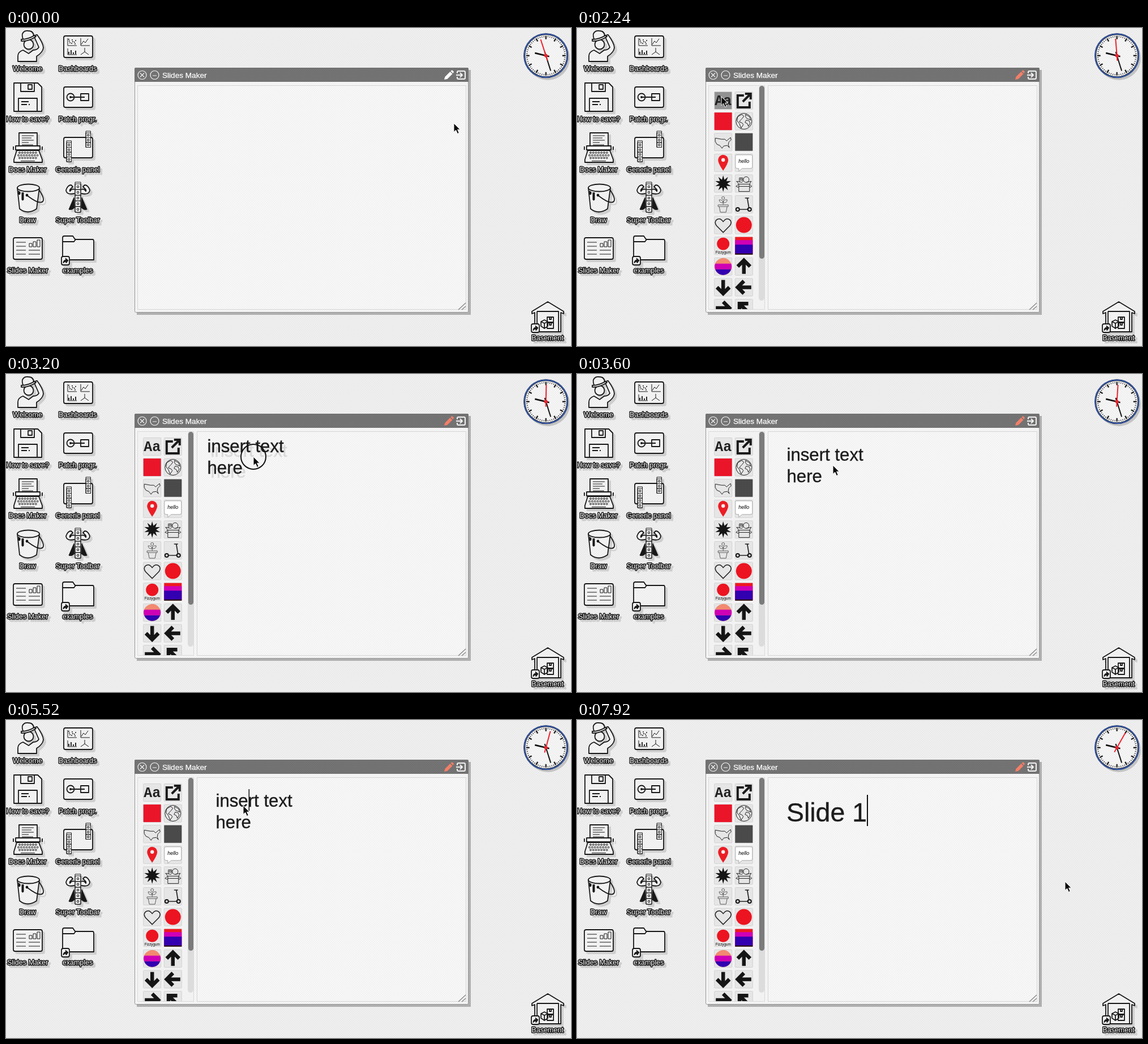
Write an HTML page that moves like this. It is 998x561 px and loops after 8 s.

```html
<!DOCTYPE html>
<html lang="en">
<head>
<meta charset="utf-8">
<title>Slides Maker</title>
<style>
html, body { margin: 0; width: 100%; height: 100%; overflow: hidden; background: #ededed; }
svg { display: block; }
text { font-family: "Liberation Sans", Arial, sans-serif; white-space: pre; }
.icons { filter: drop-shadow(4px 4px 0 #cfcfcf); }
.icons path, .icons circle, .icons ellipse { fill: none; stroke: #181818; stroke-width: 1.8; stroke-linejoin: round; }
.icons .f { fill: #f2f2f2; }
.icons .k { fill: #181818; }
.icons .t { stroke-width: 1; }
.label { font-size: 12.5px; text-anchor: middle; fill: #fff; stroke: #111; stroke-width: 2.8; paint-order: stroke; stroke-linejoin: round; }
.cell { fill: #e6e6e6; stroke: #d2d2d2; }
.item { fill: none; stroke: #222; stroke-width: 1; stroke-linejoin: round; }
</style>
</head>
<body>
<svg id="stage" width="998" height="561" viewBox="0 0 998 561"></svg>
<script>
const stage = document.getElementById('stage');
const path = (d, c = '') => `<path class="${c}" d="${d}"/>`;
const circle = (x, y, r, c = '') => `<circle class="${c}" cx="${x}" cy="${y}" r="${r}"/>`;
const box = (x, y, w, h) => `M${x} ${y}h${w}v${h}h${-w}z`;
const card = (x, y, w, h) => path(`M${x + 3} ${y}h${w - 6}q3 0 3 3v${h - 6}q0 3 -3 3h${6 - w}q-3 0 -3 -3v${6 - h}q0 -3 3 -3z`, 'f');
const label = (x, y, s) => `<text class="label" x="${x}" y="${y}">${s}</text>`;
const range = (n, f) => Array.from({length: n}, (_, i) => f(i)).join('');
const strip = (x, y, w, n) => path(box(x, y, w, 3 + n * w), 'f t') +
  range(n, i => path(box(x, y + 3 + i * w, w, w) + box(x + w / 2 - 1.5, y + 1.5 + (i + .5) * w, 3, 3), 't'));
const shortcut = (x, y) => card(x, y, 14, 15) +
  path(`M${x + 3} ${y + 12}q0 -6 5 -6l-1 -3 5 4 -4 5 0 -3q-3 0 -5 3z`, 'k t');

const welcome = path('M21 59V50Q21 42 30 39L40 45L48 39Q55 39 58 34L51 18Q50 12 55 12Q66 27 66 35Q65 43 54 50V59Z', 'f') +
  circle(40, 29, 8.5, 'f') + path('M30 19C26 9 32 4 39 5C47 5 49 10 49 15M27 23Q40 24 53 15L50 13Q40 20 27 20Z', 'f');

const floppy = path('M14 97H56L63 104V147H14Z', 'f') +
  path('M26 97V112H50V97M39 100h7v8h-7zM22 147V124H55V147') + path('M27 130h13M27 135h10M40 135h2');

const typewriter = path('M23 211V185H55V211', 'f') +
  path('M28 190h21M28 194h17M28 198h21M28 202h12M28 206h20', 't') +
  path('M17 208H60V215H17ZM13 209v6M64 209v6M19 216H58L64 232V237H14V232Z', 'f') +
  range(3, r => range(7 + r % 2, i => circle(24 + i * 4.8 - (r % 2) * 2, 220 + r * 4.6, 1.4, 't'))) +
  path('M26 234.5H51', 't');

const bucket = path('M20 282L24 319Q38 330 54 319L59 282', 'f') +
  '<ellipse class="f" cx="39.5" cy="282" rx="19.5" ry="6.5"/>' +
  path('M58 285Q69 301 65 306Q59 312 38 296') + circle(37, 295, 1.5, 'k') +
  path('M22 287V293q1.5 2 3 0V289M28 290V303q1.5 2 3 0V290', 'k t');

const slides = card(13, 370, 51, 38) +
  path('M18 378h17M18 385h17M18 392h17M18 399h17M40 392h20M40 399h20', 't') +
  path('M41 380h5v6h-5zM48 377h5v9h-5zM55 374h5v12h-5z', 't');

const dashboards = card(102, 14, 51, 38) +
  range(9, i => circle(111 + i * 5 % 14, 20 + i * 7 % 9, .6, 'k t')) +
  path('M109 18v13h16M132 18v13h16M133 29l4 -6 3 3 5 -7M109 36v11h16M139 35v7l-7 5M139 42l7 5', 't') +
  path('M111 46v-4M115 46v-7M119 46v-3M123 46v-6');

const patch = card(102, 104, 51, 36) + circle(114, 122, 6.5) + path('M114 122H139M132 116h14v12h-14z') + circle(114, 122, 1, 'k');
const panel = card(102, 193, 51, 36) + strip(107, 199, 8.5, 4) + strip(141, 182, 8.5, 3);
const hero = path('M120 299L111 320Q116 322 121 317ZM134 299L143 320Q138 322 133 317Z', 'k t') +
  path('M121 292Q107 295 106 286Q109 277 115 277L118 280L114 284Q112 286 113 288Q116 283 121 285M133 292Q147 295 148 286Q145 277 139 277L136 280L140 284Q142 286 141 288Q138 283 133 285', 'f') +
  strip(122, 272, 10, 5);
const folder = path('M100 409V370Q100 367 103 367H118L122 373H153Q155 373 155 376V409Z', 'f') + path('M100 377H120L123 373') + shortcut(98, 403);
const basement = path('M929 504V500L957 483L985 500V504L980 502V536H934V502Z', 'f') + path('M938 500H976V536M938 500V530') +
  path('M956 510h11v9h-11zM956 520h11v10h-11zM945 518l6 -3 6 3v8l-6 4 -6 -4zM945 518l6 3 6 -3M951 521v9M960 510v4h3v-4M960 520v4h3v-4') + shortcut(928, 522);

const names = ['Welcome', 'How to save?', 'Docs Maker', 'Draw', 'Slides Maker', 'Dashboards', 'Patch progr.', 'Generic panel', 'Super Toolbar', 'examples'];
const desktop = `<g class="icons">${welcome + floppy + typewriter + bucket + slides + dashboards + patch + panel + hero + folder + basement}
  ${names.map((s, i) => label(i < 5 ? 38 : 126.5, 76 + i % 5 * 89, s)).join('')}${label(956.5, 551, 'Basement')}</g>`;

const tick = i => `<path d="M0 -35V${i % 5 ? -32.5 : -29}" transform="rotate(${i * 6})" stroke="#222" stroke-width="${i % 5 ? 1 : 2.4}"/>`;
const clock = `<circle cx="957" cy="53" r="39" fill="#c4c4c4"/><g transform="translate(953.7 48.8)">
  <circle r="38" fill="#f4f4f4" stroke="#222" stroke-width="3"/><circle r="38.3" fill="none" stroke="#3459b0" stroke-width="2"/>
  ${range(60, tick)}
  <path d="M0 6V-20" transform="rotate(283.5)" stroke="#111" stroke-width="2.6"/>
  <path d="M0 7V-28" transform="rotate(162.5)" stroke="#111" stroke-width="2"/>
  <g id="second"><path d="M0 9V-30" stroke="#f0202c" stroke-width="2"/><circle r="3" fill="#f0202c"/></g></g>`;

// Palette items are drawn around the middle of their cell.
const bigArrow = a => `<path d="M0 13V-10M-11 0L0 -11L11 0" fill="none" stroke="#151515" stroke-width="6.5" transform="rotate(${a})"/>`;
const burst = range(20, i => {
  const r = i % 2 ? 7 : 14.5, a = i * Math.PI / 10;
  return `${i ? 'L' : 'M'}${(r * Math.sin(a)).toFixed(1)} ${(-r * Math.cos(a)).toFixed(1)}`;
});
const wheel = x => `<circle cx="${x}" cy="9" r="3" fill="#ddd" stroke="#151515" stroke-width="2"/>`;
const items = [
  '<text x="0" y="8" text-anchor="middle" style="font:bold 25px \'Liberation Mono\',monospace" fill="#222">Aa</text>',
  '<path d="M0 -9H-11V12H10V2M2 -12H12V-2M11 -11L-2 2" fill="none" stroke="#1a1a1a" stroke-width="4"/>',
  '<rect x="-15.5" y="-15.5" width="31" height="31" fill="#ea1529"/>',
  circle(0, 0, 14, 'item') + path('M-11 -8L-4 -12L0 -9L-3 -5L-6 -2L-8 1L-3 3L-1 6L-5 12L-8 4L-12 -1ZM3 -12L10 -8L12 -2L8 -4L5 -5L3 -8ZM4 -2L9 -1L11 3L8 9L6 4L2 2Z', 'item'),
  path('M-14 -7L-3 -5L3 -5L6 -2L13 -8L14 -4L10 0L9 5L11 10L7 6L1 7L-2 11L-6 6L-11 4L-14 -1Z', 'item'),
  '<rect x="-15.5" y="-15.5" width="31" height="31" fill="#4a4a4a"/>',
  '<path d="M0 14Q-9 1 -9 -5A9 9 0 0 1 9 -5Q9 1 0 14Z" fill="#ec1c24"/><circle cy="-5" r="3.2" fill="#eee"/>',
  '<path d="M-13 -14H13Q15 -14 15 -11V7Q15 10 12 10H-3L-9 15V10H-12Q-15 10 -15 7V-11Q-15 -14 -13 -14Z" fill="#fff" stroke="#aaa"/><text y="0" text-anchor="middle" font-size="9" font-style="italic">hello</text>',
  `<path d="${burst}Z" fill="#151515"/>`,
  path('M-9 1H10V14H-9ZM-9 1L-14 5L-9 7M10 1L14 5L10 7M-9 1L-13 -4L-3 -2M10 1L13 -4L4 -2M-8 -3V-10H-2V-3M-9 5H10', 'item') + circle(4, -7, 5, 'item') + circle(-5, -7, 1.5, 'item'),
  '<g opacity=".7">' + path('M-9 1H9V4H-9ZM-7 4L-5 14H5L7 4M0 1V-7M0 -3Q-7 -2 -7 -8Q-1 -8 0 -3Q1 -9 7 -8Q7 -2 0 -3', 'item') + circle(0, -11, 2.5, 'item') + '</g>',
  '<path d="M-10 9H5L9 7L6 -11M2 -11H9" fill="none" stroke="#222" stroke-width="1.7"/>' + wheel(-11) + wheel(10),
  '<path d="M0 13L-12 1Q-16 -5 -12 -9Q-6 -14 0 -6Q6 -14 12 -9Q16 -5 12 1Z" fill="none" stroke="#222" stroke-width="1.5"/>',
  '<circle r="14" fill="#ec1420"/>',
  '<circle cy="-3.5" r="11" fill="#ec1420"/><text y="13.5" text-anchor="middle" font-size="6.3">Fizzygum</text>',
  '<path d="M-15.5 -15.5H15.5V15.5H-15.5Z" fill="#ef1a20"/><path d="M-15.5 -10H15.5V15H-15.5Z" fill="#cf00b5"/><path d="M-15.5 -2H15.5V13.5H-15.5Z" fill="#3200b0"/><path d="M-15.5 13.5H15.5V15.5H-15.5Z" fill="#111"/>',
  '<circle r="15" fill="#f28a70"/><path d="M-14.1 -5H14.1A15 15 0 0 1 14.1 5H-14.1A15 15 0 0 1 -14.1 -5Z" fill="#cf00b5"/><path d="M-14.1 5H14.1A15 15 0 0 1 -14.1 5Z" fill="#3200b0"/>',
  bigArrow(0), bigArrow(180), bigArrow(-90), bigArrow(90), bigArrow(-45)
];
const palette = `<g id="palette"><rect x="232.5" y="101.5" width="99" height="395" fill="#f2f2f2" stroke="#dadada"/>
  <g clip-path="url(#clip)">${items.map((s, i) => `<g transform="translate(${258.2 + i % 2 * 36.6} ${128 + (i >> 1) * 36.6})"><rect class="cell"${i ? '' : ' id="hot"'} x="-15.5" y="-15.5" width="31" height="31" rx="1"/>${s}</g>`).join('')}</g>
  <rect x="321" y="102" width="10" height="379" rx="5" fill="#dcdcdc"/><rect x="322" y="102" width="9" height="305" rx="4.5" fill="#7b7b7b"/></g>`;

const frame = `<path d="M231 74H821V506H231Z" fill="#b0b0b0"/><rect x="227.5" y="70.5" width="589" height="431" rx="2" fill="#f5f5f5" stroke="#999"/>
  <path d="M227 72q0 -2 2 -2H815q2 0 2 2V95H227Z" fill="#737373"/>
  <g fill="none" stroke="#f4f4f4" stroke-width="1.2"><circle cx="240.5" cy="83" r="7.5"/><circle cx="262.5" cy="83" r="7.5"/>
  <path d="M237 79.5l7 7M244 79.5l-7 7M259 84h7"/><path stroke-width="2" d="M797 80V78Q797 76 799 76H809Q811 76 811 78V88Q811 90 809 90H799Q797 90 797 88V86M795 83H805M802 79L806 83L802 87"/></g>
  <text x="276" y="88" font-size="13.6" fill="#fff" stroke="#fff" stroke-width=".25">Slides Maker</text>
  <path id="pencil" d="M774 91L775.5 86L784.5 77L788.5 81L779.5 90ZM785.5 76L787 74.7Q788 74 789 75L790.5 76.5Q791.3 77.5 790.5 78.5L789.3 80Z"/>
  <rect id="canvas" y="101.5" height="395" fill="#f6f6f6" stroke="#d6d6d6"/>`;

stage.innerHTML = `<defs><clipPath id="clip"><path d="M233 102H321V496H233Z"/></clipPath>
  <pattern id="weave" width="4" height="4" patternUnits="userSpaceOnUse"><path d="M0 0h1v1h-1zM2 2h1v1h-1z" fill="#000" opacity=".045"/></pattern></defs>
  <rect width="998" height="561" fill="#eee"/>${desktop}${clock}${frame}
  <rect width="998" height="561" fill="url(#weave)"/>${palette}
  <path d="M799 497L812 485M805 497L812 491" stroke="#888" stroke-width="1.4"/>
  <g id="words"></g><path id="caret" stroke="#111"/>
  <circle id="press" r="22" fill="none" stroke="#111" stroke-width="2"/>
  <path id="mouse" d="M0 0V15.5L3.7 12.2L6.5 18.5L9.3 17.2L6.6 11.2H11.2Z" fill="#0a0a0a" stroke="#fff" stroke-width="1"/>`;

const el = Object.fromEntries([...stage.querySelectorAll('[id]')].map(e => [e.id, e]));
const show = (e, on) => e.setAttribute('display', on ? 'inline' : 'none');
const within = (t, a, b) => t >= a && t < b;

// time, x, y
const route = [[0, 791, 168], [420, 783, 84], [640, 783, 84], [1120, 854, 119], [1220, 854, 119], [2080, 255, 121], [2360, 255, 121],
  [3200, 437, 146], [3400, 452, 161], [3700, 452, 161], [4300, 421, 151], [4700, 421, 151], [4900, 419, 151], [7000, 419, 151], [7760, 862, 285], [8000, 862, 285]];
const keys = [5600, 5760, 5900, 6060, 6240, 6880, 7040];
const em = [.667, .222, .222, .556, .556, .278, .556];

function pointer(t) {
  const i = route.findIndex(p => p[0] > t), [a, x, y] = route[i - 1], [b, u, v] = route[i];
  const k = (t - a) / (b - a), s = k * k * (3 - 2 * k);
  return [x + (u - x) * s, y + (v - y) * s];
}
const line = (s, x, y, size, fill = '#1c1c1c') => `<text x="${x}" y="${y}" font-size="${size}" fill="${fill}" stroke="${fill}" stroke-width=".35">${s}</text>`;
const prompt = (x, y, fill) => line('insert text', x, y, 31.2, fill) + line('here', x, y + 37.5, 31.2, fill);

function words(t, x, y) {
  const n = keys.filter(k => k <= t).length;
  let html = '', caret = 'M429.3 122V160', weight = 1.5;
  if (n) {
    const width = em.slice(0, n).reduce((a, b) => a + b);
    const size = Math.min(64, 142 / width), end = 371 + width * size;
    html = line('Slide 1'.slice(0, n), 370, 161.5 + .37 * size, size);
    caret = `M${end} ${159.5 - .59 * size}V${159.5 + .59 * size}`;
    weight = 2;
  } else if (t >= 3400) {
    html = prompt(370.5, 153.3);
  } else if (t >= 2420) {
    const left = x - 81.5, top = y - 7.7;
    html = prompt(left + 6, top + 7.5, '#d8d8d8') + prompt(left, top);
  }
  el.words.innerHTML = html;
  el.caret.setAttribute('d', caret);
  el.caret.setAttribute('stroke-width', weight);
  show(el.caret, t >= 4440 && t % 1000 >= 500);
}

function draw(now) {
  const t = now % 8000, [x, y] = pointer(t), editing = t >= 580;
  el.second.setAttribute('transform', `rotate(${-18 + t * .006})`);
  el.mouse.setAttribute('transform', `translate(${x} ${y})`);
  el.press.setAttribute('transform', `translate(${x} ${y})`);
  show(el.press, within(t, 460, 580) || within(t, 2320, 3400) || within(t, 4360, 4480));
  el.pencil.setAttribute('fill', editing ? '#f47f68' : '#fff');
  show(el.palette, editing);
  el.canvas.setAttribute('x', editing ? 337.5 : 232.5);
  el.canvas.setAttribute('width', editing ? 475 : 580);
  const hover = editing && Math.abs(x - 258.5) < 15.5 && Math.abs(y - 128) < 15.5;
  el.hot.style.fill = hover ? '#929292' : '';
  words(t, x, y);
  requestAnimationFrame(() => draw(performance.now()));
}
draw(performance.now());
</script>
</body>
</html>
```
